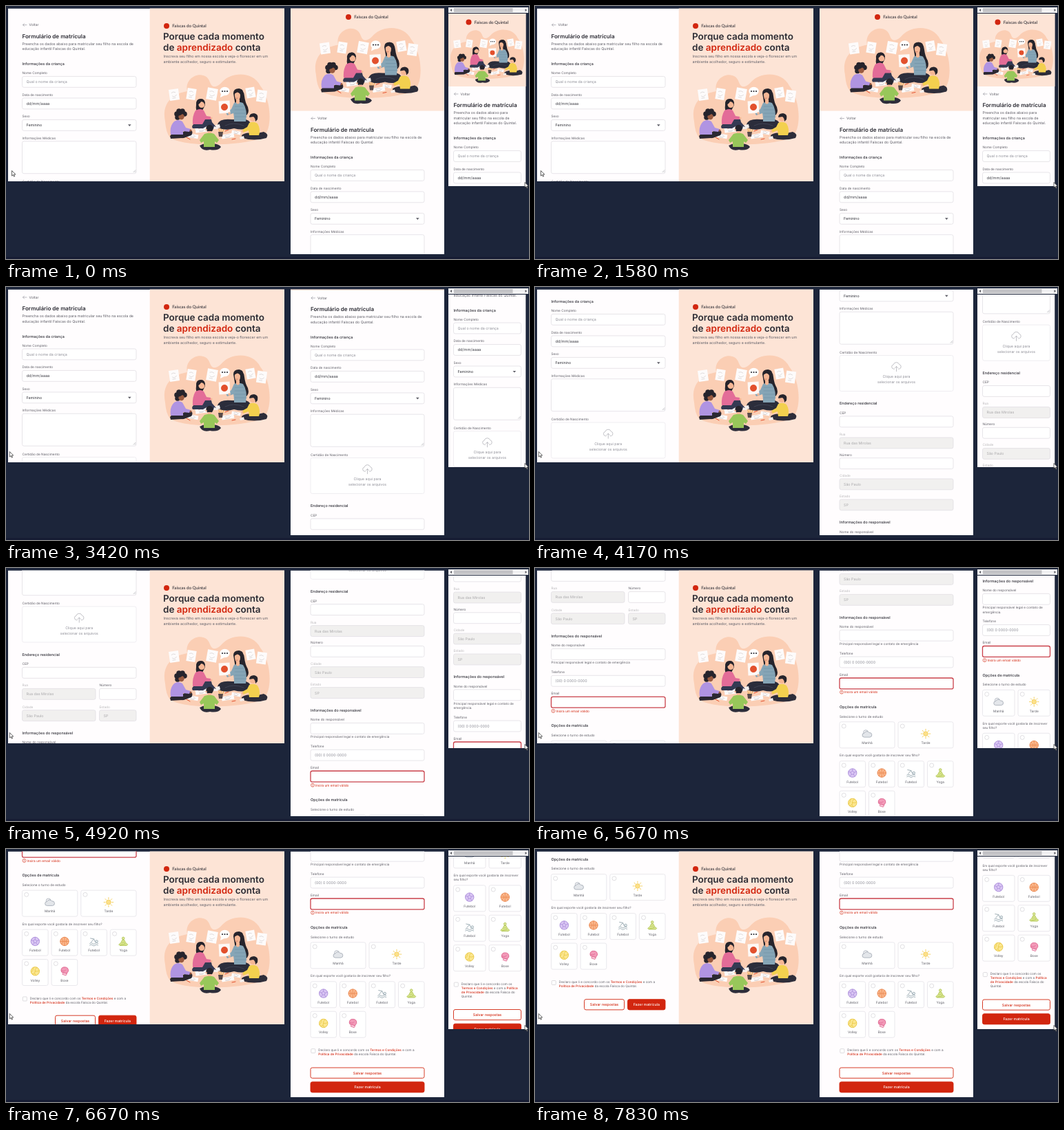
Write an HTML page that moves like this. It is 759x368 px and loops after 7.91 s.

```html
<!DOCTYPE html>
<html lang="pt-BR">
<head>
<meta charset="utf-8">
<title>Formulário de matrícula</title>
<style>
html, body { margin: 0; width: 100%; height: 100%; overflow: hidden; background: #1c253a; }
svg { display: block; width: 759px; height: 368px; font-family: Inter, "Open Sans", sans-serif; text-rendering: geometricPrecision; }
.logo { font-family: Lato, sans-serif; }
</style>
</head>
<body>
<svg id="stage" viewBox="0 0 759 368"></svg>
<script>
const INK = '#2c2c34', SOFT = '#5d5d66', PALE = '#8e8e97', OFF = '#b9b8bb';
const RED = '#d2260f', LINE = '#e1dfe4', PEACH = '#fde4d6', BLOB = '#fbceb4';
const SKIN = '#f6b795', BROWN = '#9a5b40', HAIR = '#26242c', JEANS = '#2b2d3b';

// ---- drawing helpers: each returns SVG markup ----
const rect = (x, y, w, h, fill, more = '') => `<rect x="${x}" y="${y}" width="${w}" height="${h}" fill="${fill}" ${more}/>`;
const circ = (x, y, r, fill, more = '') => `<circle cx="${x}" cy="${y}" r="${r}" fill="${fill}" ${more}/>`;
const path = (d, fill, more = '') => `<path d="${d}" fill="${fill}" ${more}/>`;
const line = (d, color, w = 0.7) => path(d, 'none', `stroke="${color}" stroke-width="${w}" stroke-linecap="round" stroke-linejoin="round"`);
const group = (x, y, s, extra = '') => `<g transform="translate(${x} ${y})${extra}">${s}</g>`;
// y is the middle of the text line; *stars* mark red words
const text = (x, y, s, size, fill = INK, weight = 400, more = '') =>
  `<text x="${x}" y="${y + size * 0.35}" font-size="${size}" fill="${fill}" font-weight="${weight}" ${more}>` +
  s.replace(/\*(.+?)\*/g, `<tspan fill="${RED}" font-weight="500">$1</tspan>`) + '</text>';
const mid = 'text-anchor="middle"';
const box = (x, y, w, h, fill = '#fff', color = LINE, sw = 0.8) =>
  rect(x, y, w, h, fill, `rx="2.5" stroke="${color}" stroke-width="${sw}"`);
const logo = (x, y) => circ(x, y, 4, RED) + text(x + 8.3, y, 'Faíscas do Quintal', 6.2, INK, 500, 'class="logo"');

// ---- classroom picture ----
function sheet(x, y, w, h, turn) {
  const marks = `M${-w * .25} ${-h * .2}q${w * .2} -2 ${w * .4} 0M${-w * .2} ${h * .1}q${w * .2} 3 ${w * .45} -1M${-w * .2} ${h * .3}h${w * .3}`;
  return group(x, y, rect(-w / 2, -h / 2, w, h, '#fdfbfb') + line(marks, '#cfc8c8', .6), ` rotate(${turn})`);
}
const blob = path('M231 168C226 145 238 128 263 124C258 101 290 91 296 111C299 120 306 119 314 110C328 95 359 95 369 116C384 134 388 176 374 190C350 204 256 206 238 191Q232 184 231 168Z', BLOB);

const teacher =
  path('M330 127Q330 120 338 120Q345 121 346 131Q347 140 351 147Q354 157 347 160L335 157Z', HAIR) +
  path('M307 172Q310 163 328 165L348 165Q357 168 355 176Q345 182 331 178Q318 182 308 177Z', JEANS) +
  line('M318 174Q330 168 345 174', '#454859', .8) +
  path('M331 141Q337 138 344 141Q351 151 348 168H331Q331 160 330 156L321 159L319 155L327 150Z', '#86a5b6') +
  line('M332 146h13M332 151h16M332 156h17M332 161h17', '#6c8fa3', .6) +
  path('M334 136h5v5q-2.5 3-5 0z', SKIN) + path('M332 126Q338 124 340 129Q340 137 336 137.5Q331 136 332 126Z', SKIN) +
  path('M330 128Q335 127 337 123Q342 128 341 136Q346 128 343 122Q336 117 330 128Z', HAIR) +
  line('M333.5 134q1.3 1 2.6 0', '#a5493c', .5) +
  group(317, 147, rect(-8, -9, 16, 18, '#fdf8f5') + circ(0, 0, 5, '#e2502d'), ' rotate(-3)') +
  circ(324, 156, 1.8, SKIN) + path('M304 173l6-1 1 5-8 1z', '#f5efec');

const pinkGirl =
  path('M276 144Q275 135 283 135Q290 136 289 144L285 152Q274 158 276 144Z', HAIR) +
  path('M270 176Q270 170 281 170L293 162Q298 162 299 169L305 176L301 179L293 174L286 178H271Z', '#343a53') +
  path('M275 152Q282 148 287 152L291 160L297 161L297 165L289 165L285 172H271Q270 160 275 152Z', '#e36c98') +
  circ(284, 143.5, 4.5, SKIN) + path('M278 143Q281 143 283 139Q287 139 288 143Q289 135 283 135Q276 136 278 143Z', HAIR) +
  circ(298, 163, 1.5, SKIN) + path('M302 175l6 2-1 2-6 0z', '#f5efec');

const purpleGirl =
  [[248, 157], [251, 153], [256, 153], [259, 157], [249, 162], [256, 155]].map(p => circ(...p, 3.8, HAIR)).join('') +
  path('M238 189Q242 183 255 184L266 179Q273 182 269 188L258 192L239 193Z', '#2b2832') +
  path('M244 168Q250 164 256 168L261 177L268 179L266 183L257 182V187H239Q237 175 244 168Z', '#b094e2') +
  circ(254.5, 161, 4.2, BROWN) + path('M249 160Q254 159 257 156Q252 152 249 160Z', HAIR) + circ(268, 181, 1.5, BROWN);

const yellowBoy =
  path('M342 188Q349 182 361 186L374 183Q382 186 378 192Q360 197 343 192Z', '#2d2d3a') +
  path('M353 170Q360 167 365 171Q370 179 367 188H353L352 181L344 184L343 180L350 176Z', '#f3d04f') +
  circ(358.5, 163.5, 4.6, SKIN) + path('M353 162Q353 156 360 156Q367 157 365 165L362 168Q362 163 359 161Z', HAIR) +
  circ(343, 182, 1.5, SKIN) + path('M339 191l6-2 1 4-6 1z', '#f5efec');

const greenBoy =
  path('M281 203Q287 199 296 201Q308 199 312 205Q308 211 296 209Q285 212 281 203Z', '#2d2d3a') +
  path('M288 186Q296 183 302 186L309 195L306 199L303 197V205H287V197L283 199L281 195Z', '#98c75a') +
  circ(295.5, 178, 5.2, HAIR) + circ(290.5, 180, 1.3, SKIN) + rect(293, 182, 5, 3, SKIN);

const floor =
  sheet(284, 180, 18, 7, -8) + sheet(271, 189, 16, 6, 10) + sheet(322, 189, 18, 6, -10) + sheet(334, 184, 13, 5, 10) +
  line('M262 191l5 3M318 182l5-2M328 194l5-1M276 176l4 2', '#e2502d', 1) +
  line('M310 184l-1-5M312 184v-6M314 184l2-5', '#e4a336', .9) + path('M308 183h7l-1 7h-5z', '#574a4a');

const scene = blob +
  sheet(244, 129, 14, 16, -8) + sheet(269, 128, 13, 16, 9) + sheet(299, 128, 15, 17, 10) + sheet(355, 126, 13, 15, -10) + sheet(371, 131, 14, 17, 8) +
  '<ellipse cx="317.5" cy="124" rx="7.2" ry="6.2" fill="#fff"/>' + path('M312 128l-1 5 6-3z', '#fff') +
  [314, 317.5, 321].map(x => circ(x, 124, 1.1, INK)).join('') +
  floor + teacher + pinkGirl + purpleGirl + yellowBoy + greenBoy;

// ---- option icons, centred on 0,0 ----
const ball = (fill, color, d) => circ(0, 0, 6.2, fill, `stroke="${color}" stroke-width=".9"`) + line(d, color);
const rays = [...Array(8)].map((_, i) => `<path d="M0 -4.8V-6.8" transform="rotate(${i * 45})" stroke="#f3cc52" stroke-width=".9" stroke-linecap="round"/>`).join('');
const icons = {
  cloud: circ(-2, -2, 3.4, '#f4f4f6', 'stroke="#a8afb9" stroke-width=".8"') +
    path('M-4 5a3 3 0 0 1 0-6a4 4 0 0 1 7-.6a3.3 3.3 0 0 1 1 6.6z', '#e3e6ea', 'stroke="#a0a7b1" stroke-width=".8"'),
  sun: rays + circ(0, 0, 3.3, '#fce08a', 'stroke="#f3cc52" stroke-width=".8"'),
  soccer: ball('#d9c6f3', '#a888d8', 'M0-2.6L2.5-.8 1.5 2.1H-1.5L-2.5-.8zM0-2.6V-6M2.5-.8L5.8-2M1.5 2.1L3.6 5M-1.5 2.1L-3.6 5M-2.5-.8L-5.8-2'),
  basket: ball('#fbb98e', '#e88248', 'M0-6V6M-6 0H6M-4.3-4.3Q0 0-4.3 4.3M4.3-4.3Q0 0 4.3 4.3'),
  swim: circ(4, 0, 1.8, '#e8eef0', 'stroke="#93a5ad" stroke-width=".8"') +
    line('M-5-4.5L0-3.5 2 1M0-3.5L-4 1M-6 3q2-2 4 0t4 0t4 0M-6 5.5q2-2 4 0t4 0t4 0', '#93a5ad', .9),
  yoga: circ(0, -4.5, 1.8, '#dfe9a0', 'stroke="#a9bf45" stroke-width=".8"') +
    path('M-1.5-2h3l2 4 3 2.5-1.5 1.5h-10l-1.5-1.5 3-2.5z', '#dbe794', 'stroke="#a9bf45" stroke-width=".8"') + line('M-2 2.5L0 .5L2 2.5M-4 5L3 3.5', '#a9bf45'),
  volley: ball('#fbe68f', '#e8c63f', 'M0 0Q-1-4 3-5.4M0 0Q4 1 6-1M0 0Q-2 4 1.5 6M-2.5-5.5Q-3 0-5.8 2M-1 3Q-4 5-4.5 4'),
  glove: path('M-5-1Q-5-6 0-6Q6-6 5.5 0L3 3.5L-2 2Q-5 2-5-1Z', '#f29ab8', 'stroke="#dd5f8b" stroke-width=".9"') +
    path('M-2 2L3.5 3.5 2 6.2-3 4.5z', '#fbd0de', 'stroke="#dd5f8b" stroke-width=".8"') + line('M-4-1Q0 1 2-2', '#dd5f8b')
};

// ---- the enrolment form; kind is 'wide', 'tall' or 'slim' ----
function form(x, w, y, kind) {
  const wide = kind === 'wide', slim = kind === 'slim';
  let s = '';
  const put = m => { s += m; };
  const head = t => put(text(x, y, t, 5.45, INK, 500));
  const label = (t, fx = x, fill = SOFT) => put(text(fx, y, t, 4.75, fill));
  const lines = (rows, step, size, fill, fx = x) => rows.forEach((r, i) => { if (i) y += step; put(text(fx, y, r, size, fill)); });
  const field = (name, value = '', o = {}) => {
    const fx = x + (o.dx || 0), fw = o.w || w;
    label(name, fx, o.off ? OFF : SOFT);
    put(box(fx, y + 4.7, fw, 15.9, o.off ? '#f1f0ef' : '#fff', o.err ? '#c9404a' : LINE, o.err ? 1.3 : .8));
    put(text(fx + 6, y + 12.7, value, o.size || 5.3, o.fill || (o.off ? '#aaa9ab' : PALE)));
  };
  const card = (cx, cw, name, icon) => put(box(cx, y, cw, 38, '#fff', '#e4e2e7') +
    circ(cx + 6.2, y + 6.2, 3, '#fff', 'stroke="#d3d1d6" stroke-width=".7"') +
    group(cx + cw / 2, y + 17.3, icons[icon]) + text(cx + cw / 2, y + 30.6, name, 4.8, SOFT, 400, mid));

  put(line(`M${x + 6.5} ${y}H${x + 1}m2-2l-2 2 2 2`, PALE, .6) + text(x + 10, y, 'Voltar', 5, SOFT));
  y += 16.2; put(text(x, y, 'Formulário de matrícula', 8.05, INK, 600));
  y += 11;
  lines(slim
    ? ['Preencha os dados abaixo para', 'matricular seu filho na escola de', 'educação infantil Faíscas do Quintal.']
    : ['Preencha os dados abaixo para matricular seu filho na escola de', 'educação infantil Faíscas do Quintal.'], 7.6, 5.3, SOFT);
  y += 21.8; head('Informações da criança');
  y += 13.6; field('Nome Completo', 'Qual o nome da criança');
  y += 31.5; field('Data de nascimento', 'dd/mm/aaaa', { fill: '#43434b', size: 5.7 });
  y += 31.5; field('Sexo', 'Feminino', { fill: INK });
  put(path(`M${x + w - 12} ${y + 11.6}h4.6l-2.3 2.6z`, SOFT));
  y += 31.5; label('Informações Médicas');
  put(box(x, y + 4.5, w, 47) + line(`M${x + w - 4} ${y + 49.5}l3-3M${x + w - 2} ${y + 49.5}l1-1`, PALE, .5));
  y += 63.5; label('Certidão de Nascimento');
  const c = x + w / 2;
  put(box(x, y + 4.3, w, 52, '#fff', '#ebe9ee') +
    line(`M${c - 3} ${y + 24}h-1a3.2 3.2 0 0 1-.3-6.3a4.4 4.4 0 0 1 8.4-.3a3.4 3.4 0 0 1 0 6.6h-1M${c} ${y + 27.5}v-7m-2.3 2.2l2.3-2.3 2.3 2.3`, '#aaaab0') +
    text(c, y + 35.3, 'Clique aqui para', 5.2, PALE, 400, mid) + text(c, y + 43, 'selecionar os arquivos', 5.2, PALE, 400, mid));
  y += 74; head('Endereço residencial');
  y += 14; field('CEP');
  y += 31;
  const street = 'Rua das Mirolas', off = true;
  if (wide) {
    const side = { dx: 112, w: w - 112 };
    field('Rua', street, { off, w: 106.5 }); field('Número', '', side);
    y += 31.3; field('Cidade', 'São Paulo', { off, w: 106.5 }); field('Estado', 'SP', { off, ...side });
  } else {
    field('Rua', street, { off });
    y += 29.8; field('Número');
    y += 30.2; field('Cidade', 'São Paulo', { off });
    y += 30; field('Estado', 'SP', { off });
  }
  y += 38; head('Informações do responsável');
  y += 13.8; field('Nome do responsável');
  y += 25;
  lines(slim ? ['Principal responsável legal e contato de', 'emergência.'] : ['Principal responsável legal e contato de emergência'], 6.4, 4.65, SOFT);
  y += 13.8; field('Telefone', '(00) 0 0000-0000');
  y += 31; field('Email', '', { err: true });
  y += 25.3;
  put(circ(x + 3, y, 2.5, 'none', `stroke="${RED}" stroke-width=".6"`) + line(`M${x + 3} ${y - 1.2}v1.2m0 1.2v.1`, RED, .6) + text(x + 7, y, 'Insira um email válido', 4.75, RED));
  y += 21.6; head('Opções de matrícula');
  y += 13.7; label('Selecione o turno de estudo');
  y += 7.9;
  const half = (w - 5) / 2, quart = slim ? half : (w - 15) / 4, cols = slim ? 2 : 4;
  card(x, half, 'Manhã', 'cloud'); card(x + half + 5, half, 'Tarde', 'sun');
  y += 49;
  lines(slim ? ['Em qual esporte você gostaria de inscrever', 'seu filho?'] : ['Em qual esporte você gostaria de inscrever seu filho?'], 6, 4.6, SOFT);
  y += 8;
  const sports = ['Futebol soccer', 'Futebol basket', 'Futebol swim', 'Yoga yoga', 'Volley volley', 'Boxe glove'];
  sports.forEach((p, i) => {
    if (i && i % cols === 0) y += 43.4;
    card(x + (i % cols) * (quart + 5), quart, ...p.split(' '));
  });
  y += 56.5;
  put(rect(x + .8, y - 2, 6, 6, '#fff', 'rx="1" stroke="#cfcdd2" stroke-width=".7"'));
  lines(slim
    ? ['Declaro que li e concordo com os', '*Termos e Condições* e com a *Política*', '*de Privacidade* da escola Faísca do', 'Quintal.']
    : ['Declaro que li e concordo com os *Termos e Condições* e com a', '*Política de Privacidade* da escola Faísca do Quintal.'], 6, 4.65, SOFT, x + 11.3);
  y += wide ? 19.2 : 19.4;
  const button = (bx, bw, name, fill, ink) => put(box(bx, y, bw, 15.2, fill, RED, .9) + text(bx + bw / 2, y + 7.7, name, 5.2, ink, 500, mid));
  if (wide) {
    button(x + 48, 58, 'Salvar respostas', '#fff', RED); button(x + 111, w - 111, 'Fazer matrícula', RED, '#fff');
  } else {
    button(x, w, 'Salvar respostas', '#fff', RED);
    y += 20.7; button(x, w, 'Fazer matrícula', RED, '#fff');
  }
  return s;
}

// ---- stage ----
// a white window with clipped, scrolling content
const panel = (id, x, y, w, h, s) => `<clipPath id="${id}Clip">${rect(x, y, w, h, '#000')}</clipPath>` +
  `<g clip-path="url(#${id}Clip)">${rect(x, y, w, h, '#fffdfe')}<g id="${id}">${s}</g></g>`;
const use = t => `<use href="#scene" transform="${t}"/>`;
const arrow = (id, x, y) => `<g id="${id}" transform="translate(${x} ${y})">` +
  path('M0 0V7.6L1.8 6L3 8.7L4.2 8.2L3 5.5H5.4Z', '#fff', 'stroke="#222" stroke-width=".7"') + '</g>';

document.getElementById('stage').innerHTML =
  `<defs><g id="scene">${scene}</g></defs>` +
  rect(0, 0, 759, 368, '#1c253a') + rect(0, 365, 759, 3, '#161c33') +
  panel('wide', 3, 3.5, 401, 251.5, form(23.5, 165.5, 27.5, 'wide')) +
  rect(208.7, 3.5, 195.3, 251.5, PEACH) + logo(233, 29) +
  text(228, 44.5, 'Porque cada momento', 13.5, INK, 600) + text(228, 60, 'de <tspan fill="' + RED + '">aprendizado</tspan> conta', 13.5, INK, 600) +
  text(228.5, 73.3, 'Inscreva seu filho em nossa escola e veja-o florescer em um', 5.3, SOFT) +
  text(228.5, 81, 'ambiente acolhedor, seguro e estimulante.', 5.3, SOFT) + use('') +
  panel('tall', 413, 3.5, 223, 357.5, rect(413, 3, 223, 149.5, PEACH) + use('translate(219 -67.5)') + logo(497, 16) + form(442, 165, 163.5, 'tall')) +
  panel('slim', 642, 11, 112.5, 251, rect(642, 11, 113, 106, PEACH) + use('translate(484 -35) scale(.7)') + logo(671.5, 23.5) + form(649.5, 98, 128, 'slim')) +
  rect(642, 2, 116, 8, '#f1f1f2') + rect(650, 3, 85.5, 6, '#c3c3c6') +
  path('M647 4v4l-2.5-2zM753.5 4v4l2.5-2z', '#55555c') +
  arrow('hand', 8.5, 239.5) + arrow('hand2', 753, 256.5);

// ---- motion: [ms, value] points, joined by straight lines ----
const LOOP = 7910;
const tracks = {
  wide: [[3330, 0], [3420, 12.5], [4170, 63], [5670, 345], [6670, 536], [6800, 559.5]],
  tall: [[2500, 0], [2580, 12.5], [3420, 147.5], [4170, 296.5], [5670, 567], [6170, 655]],
  slim: [[2500, 0], [2580, 14], [3420, 158.5], [4170, 313], [5670, 592], [6670, 779.5], [6750, 794]],
  hand: [[1750, 8.5], [1920, 5.3]]
};
function at(track, t) {
  if (t <= track[0][0]) return track[0][1];
  for (let i = 1; i < track.length; i++) {
    const [t0, a] = track[i - 1], [t1, b] = track[i];
    if (t <= t1) return a + (b - a) * (t - t0) / (t1 - t0);
  }
  return track[track.length - 1][1];
}
const ticks = [0];
for (let k = 0; k <= 90; k++) ticks.push(Math.ceil((330 + k * 250 / 3) / 10 - 1e-6) * 10);

const parts = Object.fromEntries(Object.keys(tracks).map(id => [id, document.getElementById(id)]));
const begin = performance.now();
function draw() {
  const now = (performance.now() - begin) % LOOP;
  const t = ticks.filter(k => k <= now).pop();
  for (const id of ['wide', 'tall', 'slim']) parts[id].setAttribute('transform', `translate(0 ${-at(tracks[id], t)})`);
  parts.hand.setAttribute('transform', `translate(${at(tracks.hand, t)} 239.5)`);
  requestAnimationFrame(draw);
}
draw();
</script>
</body>
</html>
```
